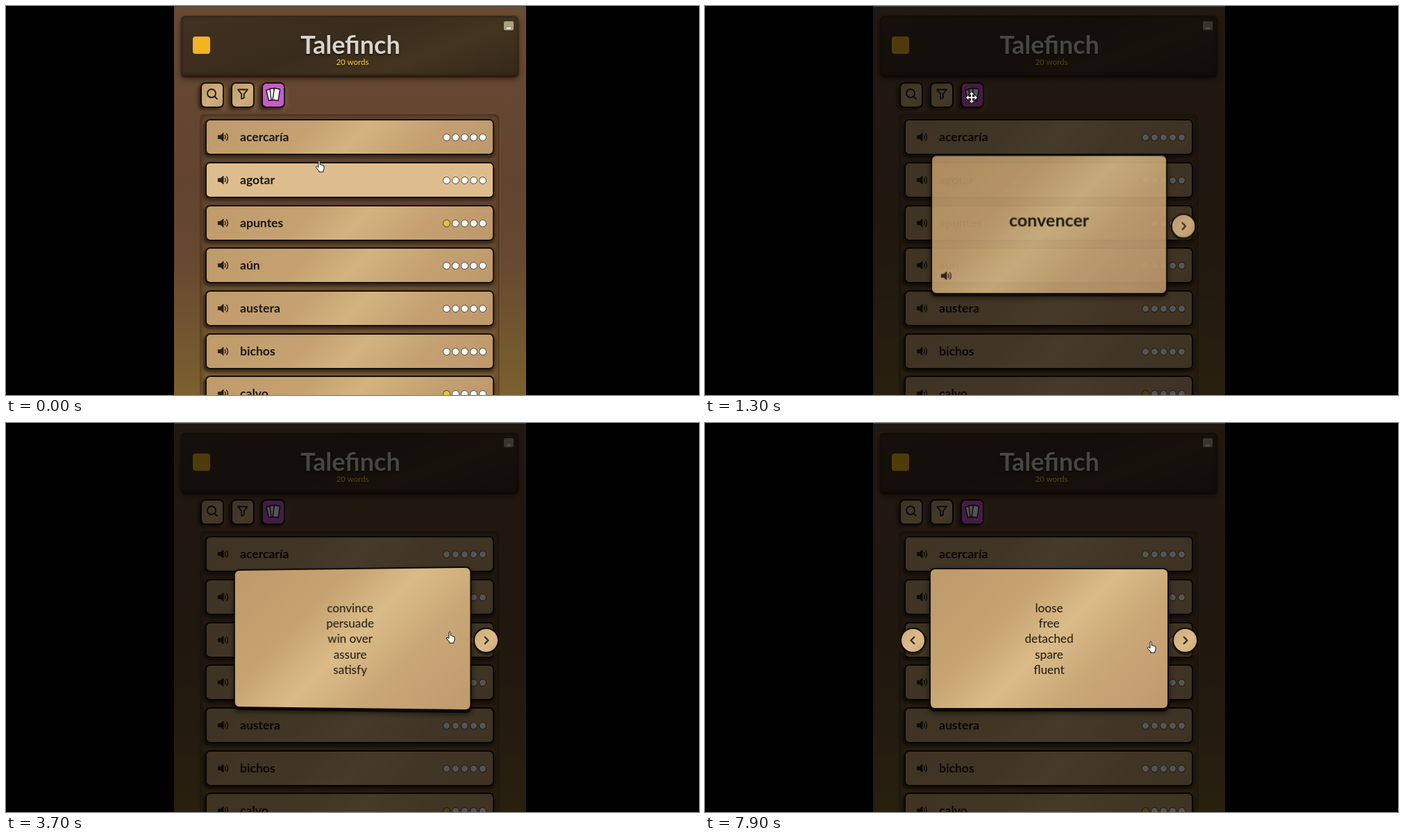
Recreate the animation shown at these times as an HTML page. Size 998x561 px, loop 8000 ms.

```html
<!DOCTYPE html>
<html lang="en">
<head>
<meta charset="utf-8">
<title>Word list with flashcards</title>
<style>
* { box-sizing: border-box; }
html, body { margin: 0; width: 100%; height: 100%; overflow: hidden; background: #000; }
body { font-family: Lato, "Open Sans", sans-serif; color: #1b1610; }
#stage { position: absolute; left: 0; top: 0; width: 998px; height: 561px; overflow: hidden; background: #000; }
#stage div, #stage svg { position: absolute; }
#panel { left: 242px; top: 0; width: 507px; height: 561px; overflow: hidden;
  background: linear-gradient(#694b34, #61442f 45%, #66492f 65%, #7b602f); border-top: 1px solid #3f4147; }
#app { left: -242px; top: -1px; width: 998px; height: 561px; }
.header { left: 252px; top: 14px; width: 486px; height: 86px; border-radius: 6px;
  background: linear-gradient(160deg, #403122, #3a2c1d 45%, #43341f 70%, #352819);
  box-shadow: 0 3px 2px #271a10, 0 5px 8px rgba(25,14,6,.6), inset 0 0 5px rgba(20,12,5,.5); }
.emblem { left: 269px; top: 44px; width: 25px; height: 25px; border-radius: 4px; background: #f2b41f; }
.center { text-align: center; white-space: nowrap; }
.title { left: 252px; width: 488px; top: 31px; font-size: 36px; line-height: 48px; font-weight: 700;
  color: #d8d4cc; text-shadow: 0 2px 3px rgba(0,0,0,.6); }
.count { left: 399px; width: 200px; top: 73px; font-size: 11.5px; line-height: 16px; font-weight: 600;
  color: #e6c52d; text-shadow: 0 1px 2px #1d1308; }
.mini { left: 717px; top: 22px; width: 14px; height: 13px; border-radius: 2px; background: #aaa083; }
.mini::after { content: ""; position: absolute; left: 4px; top: 9px; width: 6px; height: 1.5px; background: #f5f2e8; }
.tool { top: 110px; width: 34px; height: 37px; border: 2px solid #15100a; border-radius: 7px;
  background: linear-gradient(135deg, #c09c6c, #d0ae7c 60%, #c4a071);
  box-shadow: -3px 3px 4px rgba(40,24,12,.75), 3px 4px 5px rgba(142,108,74,.45); }
.tool svg { left: 5px; top: 5px; }
.list { left: 279px; top: 156px; width: 432px; height: 420px; border-radius: 8px 8px 0 0;
  box-shadow: inset 3px 3px 5px rgba(45,28,14,.38), inset -3px 0 4px rgba(45,28,14,.35), 1px 0 1px rgba(140,105,70,.35); }
.row { left: 287px; width: 416px; height: 52px; border: 2px solid #15100a; border-radius: 7px; overflow: hidden;
  background: linear-gradient(135deg, #bf9a6a, #c6a272 35%, #d4b380 52%, #c4a071 75%, #bd986c); }
.shade { left: 287px; width: 416px; height: 52px; border-radius: 7px;
  box-shadow: -3px 3px 3px #3d2b1d, 2px 4px 5px rgba(48,30,16,.7), 4px 5px 6px rgba(145,110,75,.25); }
.lit { inset: 0; background: #ddbd8d; }
.word { left: 48px; top: 0; font-size: 17.6px; line-height: 48px; font-weight: 700; white-space: nowrap; }
.dot { top: 19px; width: 11px; height: 11px; border-radius: 50%; border: 1px solid #50402c; background: #fff; }
.dot.won { background: #e3c536; }
#dim { left: 0; top: 0; width: 998px; height: 561px; background: #000; }
#modal { left: 0; top: 0; width: 998px; height: 561px; transform-origin: 495px 310.5px; }
.scene { left: 323px; top: 209px; width: 345px; height: 204px; perspective: 1000px; }
#card { inset: 0; transform-style: preserve-3d; }
.face { inset: 0; border: 2px solid #0d0a06; border-radius: 8px; backface-visibility: hidden;
  background: linear-gradient(135deg, #be996a, #c7a372 32%, #dabc88 51%, #caa777 70%, #bf9a6e);
  box-shadow: 0 3px 0 #0b0805, 0 5px 9px rgba(0,0,0,.6); }
.front .center { left: 0; width: 100%; top: 76px; font-size: 25.4px; line-height: 34px; font-weight: 700; }
.back { transform: rotateY(180deg); }
.back .center { left: 0; width: 100%; top: 45px; font-size: 17.2px; line-height: 22.2px; font-weight: 500;
  color: #2b2419; white-space: pre; }
.nav { top: 295px; width: 37px; height: 37px; border-radius: 50%; border: 2px solid #0f0b07;
  background: linear-gradient(135deg, #cfa97a, #dcbb8a 55%, #cda878);
  box-shadow: 0 3px 3px rgba(0,0,0,.6), 0 4px 5px rgba(120,95,55,.35); }
.nav svg { left: 8px; top: 8px; }
</style>
</head>
<body>
<div id="stage">
  <div id="panel"><div id="app"></div></div>
  <svg id="hand" width="15" height="19" viewBox="0 0 15 19">
    <path d="M4.5 2Q4.5.7 5.6.7T6.8 2V6.4Q8.8 5.6 9 7 10.6 6.4 10.8 7.8 12.6 7.4 12.6 9V12Q12.6 14 11.4 15V17H5.4V15.6L1.2 10.8Q.4 9.4 1.8 9 2.8 8.8 4.5 10.6Z" fill="#fff" stroke="#111" stroke-width="1" stroke-linejoin="round"/>
  </svg>
  <svg id="move" width="18" height="18" viewBox="-9 -9 18 18"></svg>
</div>
<script>
const LOOP = 8000, STEP = 100;
const $ = id => document.getElementById(id);
const app = $('app');

function add(parent, cls, style = {}, html = '') {
  const node = document.createElement('div');
  node.className = cls;
  node.innerHTML = html;
  Object.assign(node.style, style);
  parent.append(node);
  return node;
}

const icon = (size, body) => `<svg width="${size}" height="${size}" viewBox="0 0 20 20" fill="none"
  stroke="#211a12" stroke-width="1.8" stroke-linecap="round" stroke-linejoin="round">${body}</svg>`;
const speaker = icon(18, `<path d="M2 7.5h3.5L10 3.5v13L5.5 12.5H2z" fill="#2a2116" stroke-width="1"/>
  <path d="M12.6 7.2q2 2.8 0 5.6M15.2 4.6q4 5.4 0 10.8" stroke-width="1.5"/>`);
const chevron = path => icon(17, `<path d="${path}" stroke="#33302b" stroke-width="2.8"/>`);

function addSpeaker(parent, left, top) {
  add(parent, '', { left: left + 'px', top: top + 'px' }, speaker);
}

// Header and toolbar
add(app, 'header');
add(app, 'emblem');
add(app, 'title center', {}, 'Talefinch');
add(app, 'count center', {}, '20 words');
add(app, 'mini');
add(app, 'tool', { left: '280px' }, icon(20, '<circle cx="9" cy="9" r="6"/><path d="M13.5 13.5L17 17"/>'));
add(app, 'tool', { left: '324px' }, icon(20, '<path d="M3 3.5H17L11.8 10V15.5L8.2 17V10Z"/>'));
const deck = add(app, 'tool', { left: '368px', background: '#c85bca' },
  `<svg width="24" height="24" viewBox="0 0 24 24" style="left:3px;top:4px" fill="#fff" stroke="#1a121c" stroke-width="1.4" stroke-linejoin="round">
  <path d="M2 5.5L8 3.5 11 19 5.5 20.5Z"/><path d="M7 3.5L13 2.5 15 19 9 20Z"/><path d="M13.5 2.5L21.5 4 19 20.5 11 19.3Z"/></svg>`);

// Word rows
add(app, 'list');
const words = ['acercaría', 'agotar', 'apuntes', 'aún', 'austera', 'bichos', 'calvo'];
const started = new Set(['apuntes', 'calvo']);
const rows = words.map((word, i) => {
  const top = (163.3 + i * 61.67) + 'px';
  add(app, 'shade', { top });
  const row = add(app, 'row', { top });
  const lit = add(row, 'lit', { opacity: 0 });
  addSpeaker(row, 15, 15);
  add(row, 'word', {}, word);
  for (let k = 0; k < 5; k++) {
    const won = k === 0 && started.has(word);
    add(row, won ? 'dot won' : 'dot', { left: (339.5 + k * 13.15) + 'px' });
  }
  return lit;
});

// Flashcard layer
const dim = add(app, '');
dim.id = 'dim';
const modal = add($('stage'), '');
modal.id = 'modal';
const card = add(add(modal, 'scene'), '');
card.id = 'card';
const front = add(card, 'face front');
const term = add(front, 'center');
addSpeaker(front, 12, 166);
const meaning = add(add(card, 'face back'), 'center');
const prev = add(modal, 'nav', { left: '280.5px' }, chevron('M12 4.5L6.5 10 12 15.5'));
const next = add(modal, 'nav', { left: '672.5px' }, chevron('M8 4.5L13.5 10 8 15.5'));
$('stage').append($('hand'), $('move'));

const arrow = 'M-1-1V-4.5H-3.4L0-8 3.4-4.5H1V-1Z';
$('move').innerHTML = ['#111', '#fff'].map((color, i) =>
  [0, 90, 180, 270].map(a => `<path d="${arrow}" transform="rotate(${a})" fill="${color}"
    stroke="${color}" stroke-width="${i ? 0 : 1.6}"/>`).join('') +
  `<rect x="-1.2" y="-1.2" width="2.4" height="2.4" fill="${color}"/>`).join('');

const deckCards = [
  ['convencer', 'convince\npersuade\nwin over\nassure\nsatisfy'],
  ['suelto', 'loose\nfree\ndetached\nspare\nfluent']
];

// Pointer hotspot: time, x, y
const path = [
  [0, 451, 223], [550, 385, 133], [700, 384, 131], [1450, 384, 131],
  [1850, 468, 178], [2400, 550, 303], [2550, 550, 303], [3000, 639, 301],
  [4320, 639, 301], [4800, 693, 319], [5850, 693, 319], [5900, 700, 325],
  [6220, 700, 325], [7000, 642, 315]
];

const clamp = v => Math.min(1, Math.max(0, v));
const ramp = (t, from, length) => clamp((t - from) / length);
const smooth = p => p * p * (3 - 2 * p);

// CSS "ease" timing curve, solved by bisection
function ease(x) {
  let lo = 0, hi = 1, u = x;
  for (let i = 0; i < 24; i++) {
    u = (lo + hi) / 2;
    const at = .75 * u * (1 - u) ** 2 + .75 * u * u * (1 - u) + u ** 3;
    if (at < x) lo = u; else hi = u;
  }
  return x >= 1 ? 1 : .3 * u * (1 - u) ** 2 + 3 * u * u * (1 - u) + u ** 3;
}

function pointer(t) {
  t = Math.max(0, t);
  const i = path.findIndex(k => k[0] > t);
  if (i < 0) return path.at(-1).slice(1);
  const [a, x, y] = path[i - 1], [b, x2, y2] = path[i];
  const p = smooth((t - a) / (b - a));
  return [x + (x2 - x) * p, y + (y2 - y) * p];
}

const within = ([x, y], l, t, r, b) => x >= l && x <= r && y >= t && y <= b;
const hover = (t, ...box) => (within(pointer(t), ...box) + within(pointer(t - STEP), ...box)) / 2;

function render(t) {
  const pos = pointer(t), open = t >= 1000;

  rows.forEach((lit, i) => {
    const top = 160 + i * 61.67;
    lit.style.opacity = open ? 0 : hover(t, 288, top, 702, top + 55);
  });
  const glow = open ? 1 - ramp(t, 1000, 200) : hover(t, 368, 110, 402, 147);
  deck.style.background = `rgb(${200 + 47 * glow},${91 + 33 * glow},${202 + 46 * glow})`;

  dim.style.opacity = .67 * ramp(t, 950, 350);
  const left = (1 - ramp(t, 1020, 430)) ** 2;
  modal.style.opacity = open ? 1 - left : 0;
  modal.style.transform = `translateY(${33 * left}px) scale(${1 - .1 * left})`;

  const second = t >= 5300;
  [term.textContent, meaning.textContent] = deckCards[+second];
  const flip = ease(ramp(t, second ? 7290 : 3250, 600));
  card.style.transform = flip ? `rotateY(${180 * flip}deg)` : 'none';

  prev.style.opacity = ramp(t, 5200, 200);
  const onNext = open && within(pos, 673, 295, 709, 331);
  next.style.transform = onNext ? 'translateY(-1px)' : 'none';

  const pointing = !open || onNext || within(pos, 323, 209, 668, 413);
  const place = (node, dx, dy, shown) => {
    node.style.transform = `translate(${pos[0] - dx}px,${pos[1] - dy}px)`;
    node.style.visibility = shown ? 'visible' : 'hidden';
  };
  place($('hand'), 5.6, .7, pointing);
  place($('move'), 9, 8, !pointing);
}

function tick() {
  const t = performance.now() % LOOP;
  render(Math.floor(t / STEP) * STEP);
  requestAnimationFrame(tick);
}
tick();
</script>
</body>
</html>
```
